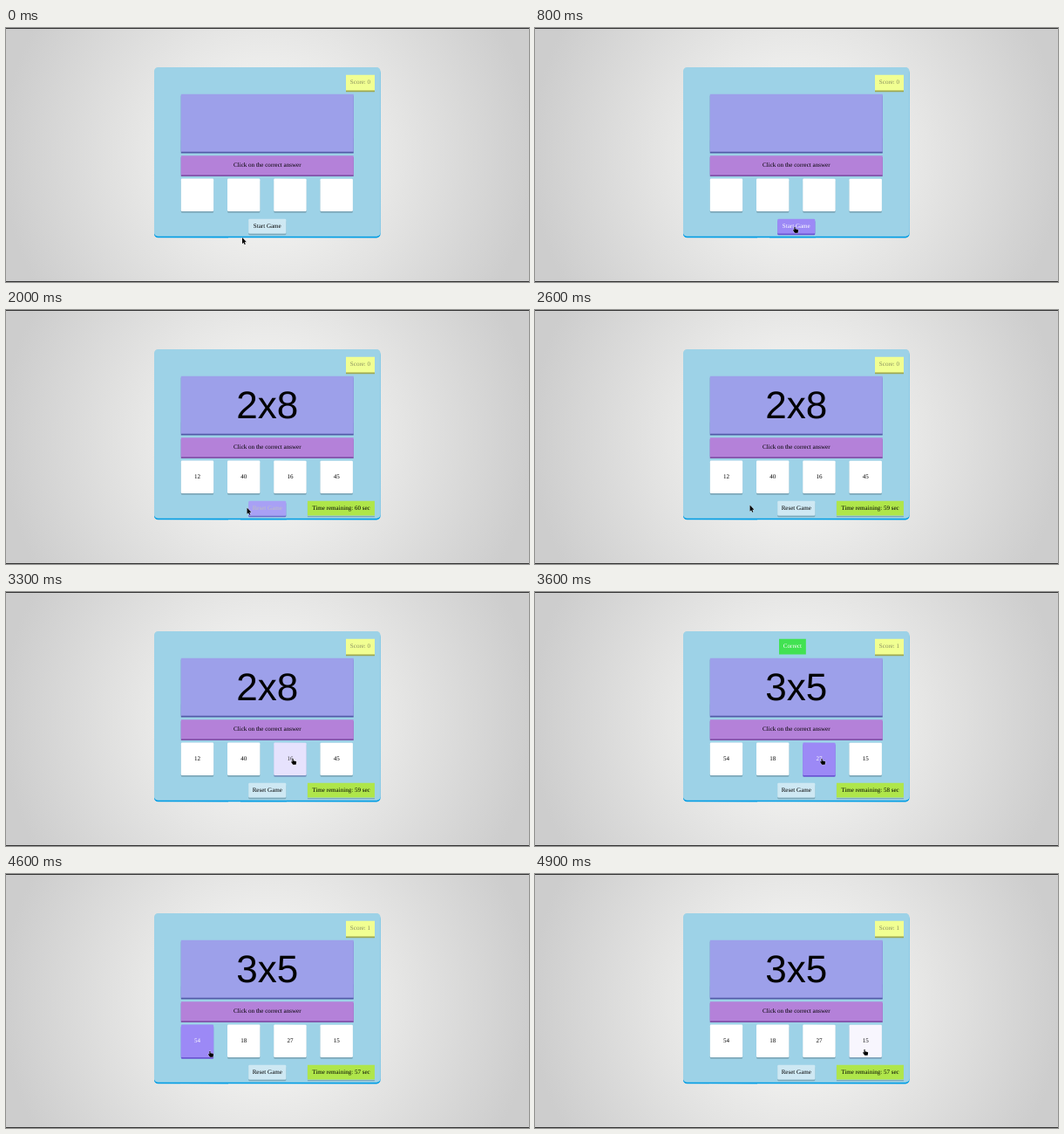
These frames come from a looping animation (600 by 291 pixels, 5000 ms). An HTML page:

```html
<!DOCTYPE html>
<html lang="en">
<head>
<meta charset="utf-8">
<title>Maths quiz</title>
<style>
  html, body { margin: 0; width: 100%; height: 100%; overflow: hidden; }
  #stage {
    position: relative; width: 600px; height: 291px; overflow: hidden;
    background: radial-gradient(circle 305px at 300px 145px, #fdfdfb, #cdcdcd);
  }
  #frame { position: absolute; inset: 0; border: solid #333; border-width: 1px 0; }
  #game {
    position: absolute; left: 169.6px; top: 45.2px; width: 590px; height: 440px;
    /* The tiny turn keeps small text free of hinting */
    transform: scale(.44) rotate(.01deg); transform-origin: 0 0;
    background: #9dd2e7; border-radius: 10px; box-shadow: 0 4px #009de4;
    font: 16px/18px "Liberation Serif", "Times New Roman", serif; color: #000;
    text-rendering: geometricPrecision;
  }
  #game div { position: absolute; text-align: center; white-space: nowrap; }
  #score { left: 500px; top: 20px; padding: 11px; background: #f1ff92; color: #888e5f; box-shadow: 0 4px #9da853; }
  #correct { left: 250px; top: 20px; padding: 11px; background: #42e252; color: #fff; }
  #question {
    left: 70px; top: 70px; width: 450px; height: 150px; background: #9da0ea; box-shadow: 0 4px #535aa8;
    font: 100px/150px "Liberation Sans", Arial, sans-serif;
  }
  #hint { left: 70px; top: 230px; width: 450px; line-height: 50px; background: #b481d9; box-shadow: 0 4px #8153a8; }
  #time {
    left: 400px; top: 395px; width: 155px; padding: 10px;
    background: rgba(181, 235, 36, .8); box-shadow: 0 4px rgba(0, 0, 0, .2);
  }
  #game .key {
    --hover: 0%; --drop: 4px; border-radius: 3px;
    background: color-mix(in srgb, #9c89f6 var(--hover), var(--base));
    color: color-mix(in srgb, #fff var(--hover), #000);
    box-shadow: 0 var(--drop) color-mix(in srgb, #6b54d3 var(--hover), rgba(0, 0, 0, .2));
  }
  .tile { --base: #fff; top: 290px; width: 85px; height: 85px; line-height: 85px; }
  #start { --base: rgba(255, 255, 255, .5); left: 246px; top: 395px; width: 78px; padding: 10px; }
  svg { position: absolute; left: 0; top: 0; overflow: visible; }
  svg path { stroke: #fff; stroke-width: .5; paint-order: stroke; }
</style>
</head>
<body>
<div id="stage">
  <div id="game">
    <div id="score"></div>
    <div id="correct">Correct</div>
    <div id="question"></div>
    <div id="hint">Click on the correct answer</div>
    <div class="key" id="start"></div>
    <div id="time"></div>
  </div>
  <svg width="8" height="9"><path id="pointer"/></svg>
  <div id="frame"></div>
</div>
<script>
const LOOP = 5000, STEP = 100, FADE = 200;
const START = 1400, ANSWER = 3500;
const ARROW = 'M0 0V7.2L1.6 5.7 2.7 8.2 3.8 7.7 2.7 5.3H4.9Z';
const HAND = 'M-.5 0H.6V2.3L3.6 2.9 4.2 3.8 3.6 6.8H.2L-1.9 3.8-1.3 3-.5 3.7Z';

const $ = id => document.getElementById(id);
const clamp = v => Math.max(0, Math.min(1, v));
const tiles = [0, 1, 2, 3].map(i => {
  const tile = document.createElement('div');
  tile.className = 'key tile';
  tile.style.left = 70 + 121 * i + 'px';
  return $('game').appendChild(tile);
});

// Where the pointer turns or rests: time, x, y
const stops = [
  [0, 271, 240], [300, 384, 57], [600, 298, 228], [1700, 297, 228], [2400, 245, 224],
  [3000, 251, 222], [3300, 329, 191], [3700, 329, 191], [3900, 256, 237],
  [4200, 251, 222], [4400, 225, 200], [4700, 237, 204], [4900, 378, 201]
];

// When each key is entered, left and pressed
const keys = [
  { el: $('start'), enter: 600, leave: 1950, press: START - STEP },
  { el: tiles[0], enter: 4350, leave: 4700 },
  { el: tiles[2], enter: 3250, leave: 3730, press: ANSWER - STEP },
  { el: tiles[3], enter: 4885, leave: LOOP }
];

function pointerAt(t) {
  const next = stops.findIndex(s => s[0] >= t);
  const [t0, x0, y0] = stops[Math.max(0, next - 1)], [t1, x1, y1] = stops[next];
  const k = clamp((t - t0) / (t1 - t0 || 1));
  const eased = k * k * (3 - 2 * k);
  return [x0 + (x1 - x0) * eased, y0 + (y1 - y0) * eased];
}

function draw(t) {
  const running = t >= START, answered = t >= ANSWER;
  $('score').textContent = 'Score: ' + (answered ? 1 : 0);
  $('question').textContent = answered ? '3x5' : running ? '2x8' : '';
  $('start').textContent = running ? 'Reset Game' : 'Start Game';
  $('time').textContent = `Time remaining: ${60 - Math.floor((t - START) / 1000)} sec`;
  $('time').hidden = !running;
  $('correct').hidden = !answered || t >= ANSWER + 1000;
  const answers = answered ? [54, 18, 27, 15] : running ? [12, 40, 16, 45] : [];
  tiles.forEach((tile, i) => tile.textContent = answers[i] ?? '');

  for (const { el, enter, leave, press } of keys) {
    const hover = clamp((t - enter) / FADE) - clamp((t - leave) / FADE);
    const pressed = t === press;
    el.style.setProperty('--hover', hover * 100 + '%');
    el.style.setProperty('--drop', pressed ? '0px' : '4px');
    el.style.transform = pressed ? 'translateY(4px)' : '';
  }

  const over = keys.some(k => t >= k.enter && t < k.leave);
  $('pointer').setAttribute('d', over ? HAND : ARROW);
  $('pointer').setAttribute('transform', `translate(${pointerAt(t)})`);
}

const origin = performance.now();
function tick() {
  const t = (performance.now() - origin) % LOOP;
  draw(Math.floor(t / STEP) * STEP);
  requestAnimationFrame(tick);
}
tick();
</script>
</body>
</html>
```
